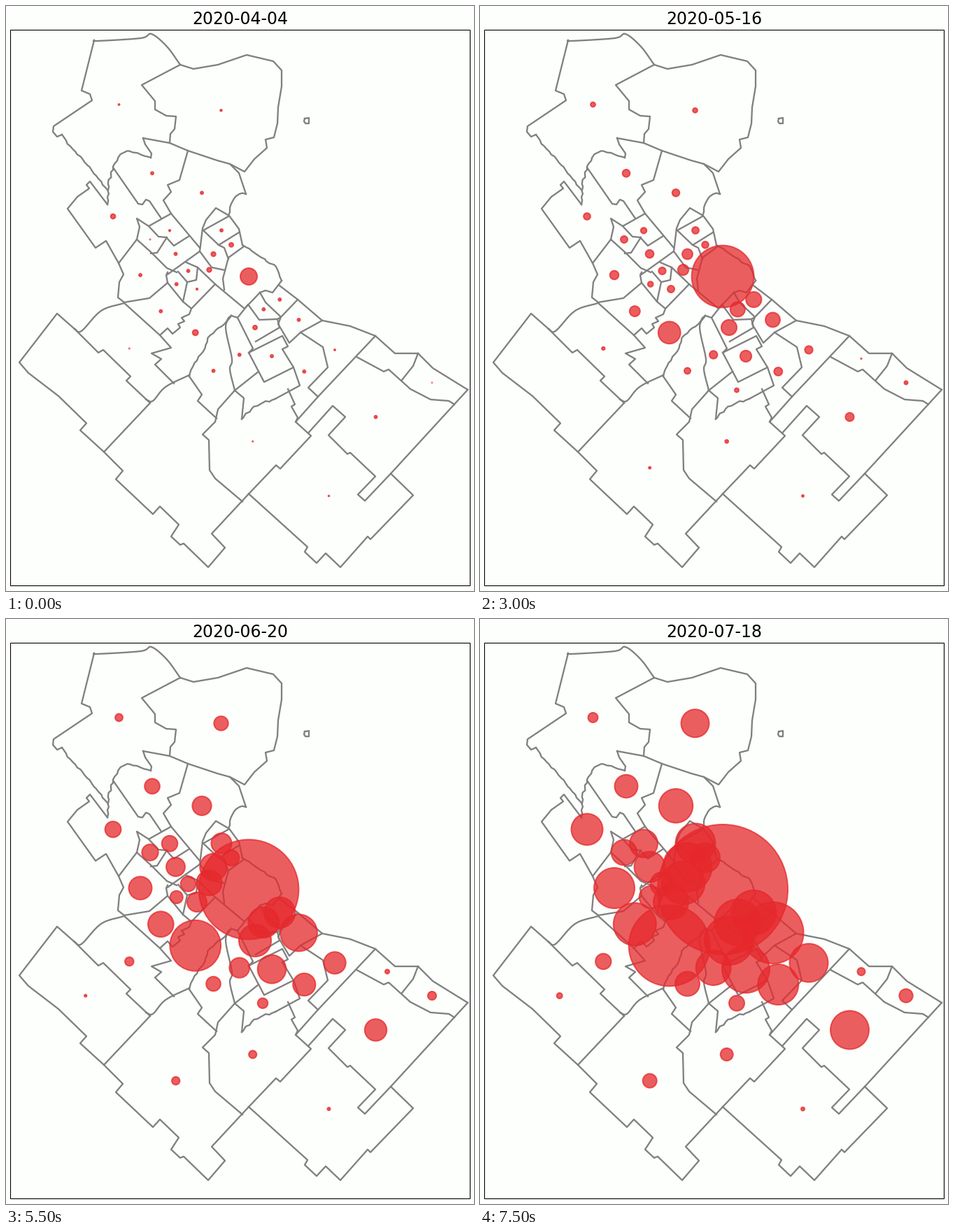
A matplotlib script that plays this animation: 669x837 px, repeating every 8 s.

```python
import numpy as np
import matplotlib.pyplot as plt
from matplotlib.animation import FuncAnimation

W, H, DPI = 669, 837, 64
PX = 72 / DPI  # points per pixel
WEEKS = 16
PAPER, RED, GRAY = "#fdfffc", "#e6282c", "#808080"
RIM = 2.0

rng = np.random.default_rng(4)
fig = plt.figure(figsize=(W / DPI, H / DPI), dpi=DPI, facecolor=PAPER)
ax = fig.add_axes([0, 0, 1, 1])
ax.set(xlim=(0, W), ylim=(H, 0))
ax.axis("off")
ax.add_patch(plt.Rectangle((6, 34), 657, 795, fill=False, ec="black", lw=1.1 * PX))
title = ax.text(335, 26, "", ha="center", va="baseline",
                family="DejaVu Sans", fontsize=23.6 * PX)


def bend(p, steps=6):
    """Catmull-Rom curve through the points."""
    q = np.vstack([2 * p[0] - p[1], p, 2 * p[-1] - p[-2]])
    t = np.linspace(0, 1, steps, endpoint=False)[:, None]
    parts = [b + t * (c - a) / 2 + t**2 * (a - 2.5 * b + 2 * c - d / 2)
             + t**3 * (1.5 * (b - c) + (d - a) / 2)
             for a, b, c, d in zip(q, q[1:], q[2:], q[3:])]
    return np.vstack(parts + [p[-1:]])


def roughen(p, amount, step=5):
    """Resample at even steps and shake the inner points."""
    s = np.r_[0, np.cumsum(np.hypot(*np.diff(p, axis=0).T))]
    at = np.linspace(0, s[-1], int(s[-1] / step) + 1)
    out = np.column_stack([np.interp(at, s, p[:, k]) for k in (0, 1)])
    out[1:-1] += rng.uniform(-amount, amount, out[1:-1].shape)
    return out


def border(*xy, curved=False, rough=0):
    p = np.reshape(xy, (-1, 2)).astype(float)
    if curved:
        p = bend(p)
    if rough:
        p = roughen(p, rough)
    ax.plot(*p.T, color=GRAY, lw=2.3 * PX, solid_joinstyle="round")


# Northern districts
border(249, 84, 230, 58, 208, 40, 193, 46, 131, 50, 126, 49, curved=True)
border(126, 49, 108, 121, 120, 126, 123, 135, 68, 172, 67, 180, 73, 187, 80, 184)
border(80, 184, 87, 197, 112, 222, 145, 263, rough=1)
border(249, 84, 194, 113, 213, 136, 213, 148, 229, 157, 243, 158, 241, 176, 235, 183, 234, 196)
border(249, 84, 268, 90, 303, 84, 344, 70, 382, 79, 394, 92, 394, 115, 389, 145,
       388, 168, 383, 188, 371, 191, 373, 203, 355, 219, 341, 237, 320, 226)
border(196, 189, 234, 196, 260, 207, 302, 221, 320, 226, 333, 239, 343, 269)
border(343, 269, 333, 268, 326, 277, 320, 285, 318, 300, rough=1.5)
border(145, 284, 146, 255, 153, 231, 164, 212, 173, 207, 207, 217, rough=1.5)
border(207, 217, 208, 211, 199, 198, 196, 189)
border(145, 284, 120, 251, 115, 256, 119, 261, 102, 273, 88, 290, 128, 346,
       143, 336, 161, 368)
border(153, 231, 189, 283, 195, 284, 200, 277, 205, 279, 222, 304)
border(260, 207, 248, 249, 231, 256, 236, 266, 225, 278, 236, 297, 277, 346)
border(427, 161, 433, 160, 433, 168, 428, 168, 426, 165, 427, 161)

# Western and inner districts
border(236, 297, 204, 315, 187, 304, 191, 316, 187, 334)
border(187, 334, 161, 368, 168, 384, 162, 395, 160, 417, 169, 424, 205, 418,
       231, 396, 229, 385, 231, 381)
border(187, 334, 207, 352, 230, 375, 244, 381)
border(204, 315, 218, 330, 229, 331, 240, 343, 262, 329)
border(207, 354, 216, 353, 230, 331)
border(231, 384, 277, 351, 281, 318, 286, 306, 300, 289, 319, 300, 333, 319, 338, 342)
border(282, 321, 318, 301)
border(282, 321, 304, 342, 333, 324)
border(304, 342, 312, 346, 318, 362)
border(340, 344, 318, 360, 310, 390, 312, 406)
border(277, 351, 294, 374, 313, 378)
border(274, 374, 299, 398, 341, 433, 363, 410)
border(258, 367, 274, 374, 272, 392, 259, 395, 246, 380)
border(259, 395, 253, 423)
border(231, 396, 253, 423, 265, 433, 299, 398)
border(169, 425, 220, 471, 231, 461, 238, 469, 249, 460, 246, 455, 255, 451,
       251, 446, 262, 441, 265, 433)
border(220, 471, 236, 489, 208, 497, 222, 505, 213, 513, 240, 540)

# South-west
border(98, 462, 108, 465, 136, 436, 169, 425, curved=True)
border(98, 462, 132, 496, 139, 492, 178, 530, 172, 536, 206, 568)
border(200, 563, 210, 565, 228, 545, 262, 528, curved=True)
border(98, 462, 73, 440, 19, 510, 32, 525, 75, 558, 115, 597, 106, 607, 140, 638, 206, 568)
border(140, 638, 167, 665, 157, 677, 210, 727, 220, 716, 247, 742, 236, 759,
       249, 771, 254, 769, 289, 803, 313, 775, 294, 755, 347, 698)
border(338, 709, 299, 676, 291, 664, 290, 621, 281, 613, 299, 595, 303, 577, 327, 550)

# Southern belt
border(322, 443, 311, 456, 291, 471, 283, 492, 268, 512, 262, 530, rough=1)
border(262, 530, 280, 556, 274, 565, 301, 590)
border(322, 443, 314, 460, 323, 505, 320, 520, 327, 550, curved=True)
border(327, 550, 361, 523)
border(322, 443, 331, 446, 346, 427, 362, 449, 388, 448, 391, 460, 357, 480)
border(331, 446, 353, 490, 347, 496, 369, 538, 411, 517, 395, 491, 403, 487, 395, 472, 347, 496)
border(363, 410, 371, 424, 393, 445, 417, 420)
border(388, 448, 393, 445, 389, 455, 405, 482, 421, 467, 452, 450)
border(421, 467, 453, 488, 460, 517, 432, 546, 446, 559)
border(327, 550, 340, 561, 337, 591)
border(337, 591, 352, 573, 385, 562, rough=2)
border(385, 562, 420, 543, 411, 517)
border(403, 548, 413, 570, 408, 573, 417, 589, 414, 595)

# Coast
border(338, 342, 357, 354, 383, 371, 394, 393, rough=1.5)
border(394, 393, 381, 410, 371, 407, 363, 410)
border(391, 400, 417, 420, 452, 450, 492, 458, 528, 472, 556, 497, 589, 497,
       610, 518, 660, 549)
border(660, 549, 550, 669, 513, 708, 503, 699, 528, 673, 492, 639, 488, 641,
       461, 614, 485, 588, 467, 572, 432, 611)
border(528, 472, 446, 559, 414, 595, 436, 615, 392, 662, 386, 657, 347, 698)
border(501, 502, 540, 523, 547, 520, 578, 548, 607, 563, 633, 565, 641, 570)
border(589, 497, 582, 515, 566, 535)
border(347, 698, 431, 774, 427, 781, 444, 797, 457, 783, 478, 803, 517, 759,
       521, 763, 582, 700, 550, 669)

centres, growth = [], []


def dot(x, y, end, pace=2.0, start=3.0):
    """A bubble whose radius grows from start to end as time ** pace."""
    centres.append((x, y))
    growth.append((start, end, pace))


dot(161.5, 141, 8, 1, 2)
dot(307.5, 149.3, 21, 2.4, 2.3)
dot(209, 239.3, 17.5, 1.6)
dot(280, 267.3, 25.3, 2.1)
dot(153, 301, 23.5, 2.8, 4.4)
dot(234, 321.3, 21, start=2.2)
dot(206, 334, 19.3, 1.5, 1.5)
dot(242.5, 354.7, 23, 1.8)
dot(192, 385, 30)
dot(308, 321, 29.5, 2.4)
dot(322, 341.7, 22, 2.5, 4)
dot(296.5, 355, 36, 2.2, 4.2)
dot(290.5, 377.5, 32, start=4.2)
dot(260.5, 379, 18, 1.7)
dot(243.7, 398, 17, 2.2)
dot(273, 405, 26, start=2.2)
dot(221.3, 436.7, 31.5, 1.8)
dot(270.7, 467.3, 59, 1.65, 5)
dot(347, 387, 94, 1, 13)
dot(391.3, 420, 33, 1.3)
dot(368.3, 434, 34, 1.4)
dot(418.5, 449, 45, 1.75)
dot(356, 460, 36, 1.5, 4)
dot(333.7, 499, 26)
dot(380, 501, 35, 1.8)
dot(426.3, 523, 30, 2.1)
dot(470, 492, 28.5, 1.9, 2)
dot(296.5, 522, 18.5)
dot(367, 549.7, 12, 1.2, 0)
dot(176.3, 490, 12.2, start=1.5)
dot(352.7, 623, 10, 1.7, 1.6)
dot(242.7, 660.7, 11, 1.6, 0)
dot(113.7, 539, 5, 2, 0)
dot(528.5, 588, 28.5)
dot(545, 504.5, 6.5, 1.5, 0)
dot(609, 539, 10.7, 1.6, 1.4)
dot(461.5, 701, 3.5, 1, 1.8)

centres = np.array(centres)
start, end, pace = np.array(growth).T
bubbles = ax.scatter(*centres.T, color=RED, alpha=0.75, lw=RIM * PX, zorder=3)


def update(week):
    r = start + (end - start) * (week / (WEEKS - 1)) ** pace
    shown = r > 1.2
    bubbles.set_offsets(centres[shown])
    bubbles.set_sizes(((2 * r[shown] - RIM) * PX) ** 2)
    title.set_text(str(np.datetime64("2020-04-04") + 7 * week))
    return bubbles, title


anim = FuncAnimation(fig, update, frames=WEEKS, interval=500, repeat=True, repeat_delay=0)
plt.show()
```
